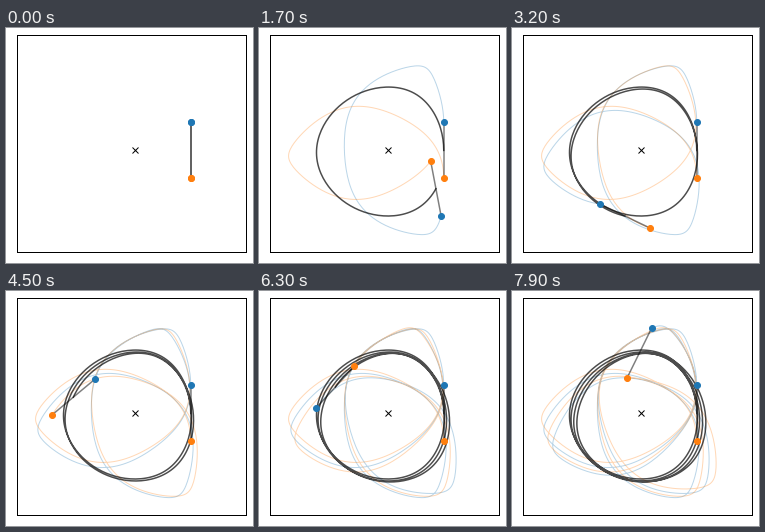
A matplotlib script for the animation above (8 s loop, 247x235 px).

```python
import numpy as np
import matplotlib.pyplot as plt
from matplotlib.animation import FuncAnimation

W, H, DPI = 247, 235, 72
LEFT, RIGHT, TOP, BOTTOM = 10.8, 239.8, 7.2, 224.2
CX, CY, UNIT = 128.75, 122.4, 56     # attractor position and rod length, px
FRAMES, SUB = 80, 8

# Waypoints in px: step -> blue x, y, orange x, y
WAYPOINTS = {
    9: (85, 115, 30, 124),
    24: (80.5, 87, 121.5, 49.5),
    32: (88, 176.5, 138, 200.5),
    45: (89, 88, 46, 124.5),
    63: (58, 117.5, 95.5, 75.5),
    79: (140, 37.5, 115, 87),
}


def ends(s):
    """Both ends of the rod for states (x, y, angle, ...)."""
    ux, uy = np.cos(s[2]) / 2, np.sin(s[2]) / 2
    return s[0] + ux, s[1] + uy, s[0] - ux, s[1] - uy


def deriv(s):
    """Rigid dumbbell, each end pulled by an inverse-square force."""
    bx, by, ox, oy = ends(s)
    kb, ko = (bx**2 + by**2) ** -1.5, (ox**2 + oy**2) ** -1.5
    ux, uy = bx - s[0], by - s[1]
    spin = 2 * (ko * (ux * oy - uy * ox) - kb * (ux * by - uy * bx))
    return np.array([s[3], s[4], s[5],
                     -(kb * bx + ko * ox) / 2,
                     -(kb * by + ko * oy) / 2, spin])


def simulate(params, steps):
    """RK4 for a batch of (speed, spin, time per frame) columns."""
    v, w, dt = params
    zero = np.zeros_like(v)
    s = np.array([zero + 1, zero, zero + np.pi / 2, zero, v, w])
    h = dt / SUB
    out = [s]
    for _ in range(steps * SUB):
        a = deriv(s)
        b = deriv(s + h / 2 * a)
        c = deriv(s + h / 2 * b)
        d = deriv(s + h * c)
        s = s + h / 6 * (a + 2 * b + 2 * c + d)
        out.append(s)
    return np.array(out)


def misfit(params, steps):
    path = simulate(params, steps[-1])
    rows = []
    for n in steps:
        bx, by, ox, oy = ends(path[n * SUB])
        x0, y0, x1, y1 = WAYPOINTS[n]
        rows += [CX + UNIT * bx - x0, CY - UNIT * by - y0,
                 CX + UNIT * ox - x1, CY - UNIT * oy - y1]
    rows.append(10 * params[1])      # the launch is almost free of spin
    return np.array(rows)


def calibrate():
    """Gauss-Newton with line search, adding one waypoint at a time."""
    p, eps = np.array([1.0, 0.0, 0.4]), 1e-6
    scales = np.array([0, 0.03, 0.1, 0.25, 0.5, 1])
    probe = np.hstack([np.zeros((3, 1)), eps * np.eye(3)])
    steps = list(WAYPOINTS)
    for k in range(1, len(steps) + 1):
        for _ in range(5):
            r = misfit(p[:, None] + probe, steps[:k])
            jac = (r[:, 1:] - r[:, :1]) / eps
            move = np.linalg.lstsq(jac, -r[:, 0], rcond=None)[0]
            trial = p[:, None] + move[:, None] * scales
            cost = (misfit(trial, steps[:k]) ** 2).sum(axis=0)
            p = trial[:, np.nanargmin(cost)]
            if np.abs(move).max() < 1e-5:
                break
    return p


path = simulate(calibrate()[:, None], FRAMES - 1)[:, :, 0].T
bx, by, ox, oy = ends(path)

plt.rcParams["axes.linewidth"] = 1
fig = plt.figure(figsize=(W / DPI, H / DPI), dpi=DPI, facecolor="white")
ax = fig.add_axes([LEFT / W, 1 - BOTTOM / H,
                   (RIGHT - LEFT) / W, (BOTTOM - TOP) / H])
ax.set(xlim=((LEFT - CX) / UNIT, (RIGHT - CX) / UNIT),
       ylim=((CY - BOTTOM) / UNIT, (CY - TOP) / UNIT), xticks=[], yticks=[])

blue_trail, = ax.plot([], [], "C0", lw=1, alpha=0.3)
orange_trail, = ax.plot([], [], "C1", lw=1, alpha=0.3)
center_trail, = ax.plot([], [], "k", lw=1.5, alpha=0.7)
ax.plot([bx[0], ox[0]], [by[0], oy[0]], "k", lw=1.5, alpha=0.5)
rod, = ax.plot([], [], "k", lw=1.5, alpha=0.5)
ax.plot(0, 0, "kx")
ax.plot(bx[0], by[0], "C0o")
ax.plot(ox[0], oy[0], "C1o")
blue, = ax.plot([], [], "C0o")
orange, = ax.plot([], [], "C1o")


def update(frame):
    i = frame * SUB
    blue_trail.set_data(bx[:i + 1], by[:i + 1])
    orange_trail.set_data(ox[:i + 1], oy[:i + 1])
    center_trail.set_data(path[0, :i + 1], path[1, :i + 1])
    rod.set_data([bx[i], ox[i]], [by[i], oy[i]])
    blue.set_data([bx[i]], [by[i]])
    orange.set_data([ox[i]], [oy[i]])
    return blue_trail, orange_trail, center_trail, rod, blue, orange


anim = FuncAnimation(fig, update, frames=FRAMES, interval=100,
                     init_func=lambda: update(0), repeat=True)
plt.show()
```
